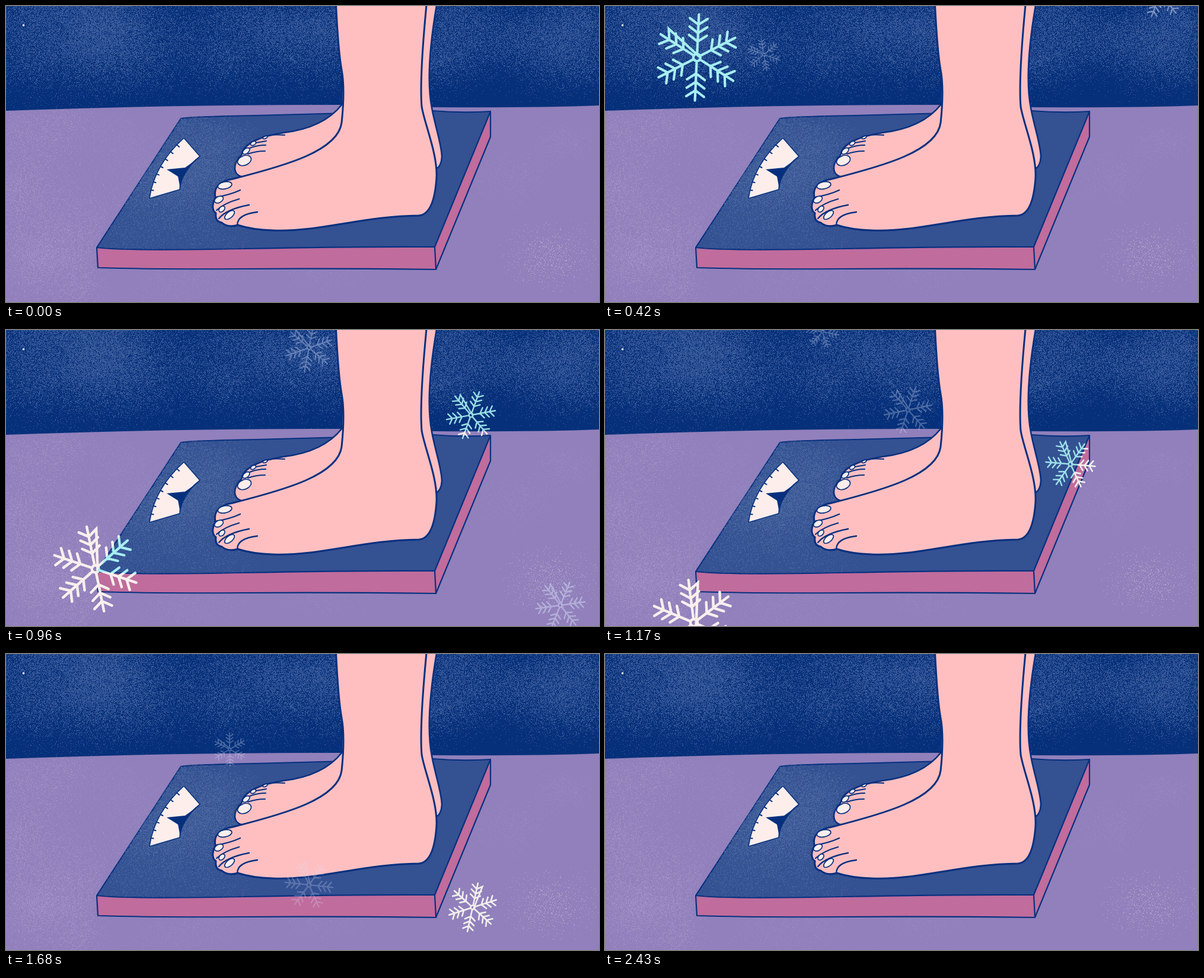
An HTML page with a canvas for the animation above (2520 ms loop, 1000 by 500 pixels).

```html
<!DOCTYPE html>
<html lang="en">
<head>
<meta charset="utf-8">
<title>Snow over a bathroom scale</title>
<style>
html, body { margin: 0; height: 100%; overflow: hidden; background: #1f4288; }
canvas { display: block; width: 100vw; height: 100vh; }
</style>
</head>
<body>
<canvas id="stage" width="1000" height="500"></canvas>
<script>
const LOOP = 2520, STEP = 30, LAST = 2430;
const INK = '#06307e', SKIN = '#ffbfc1', CREAM = '#fdeeec', CYAN = '#a6eef0', MIST = '#d3dcf5';
const stage = document.getElementById('stage').getContext('2d');
const scene = document.createElement('canvas');
scene.width = 1000;
scene.height = 500;
const g = scene.getContext('2d');

let seed = 7;
const rand = () => (seed = (seed * 16807) % 2147483647) / 2147483647;

const wall = new Path2D('M0 0H1000V180H0Z');
const floor = new Path2D('M0 177Q300 166 560 167L720 171Q900 172 1000 168V500H0Z');
const plate = new Path2D(`M295 190L153 408Q200 414 400 410T723 407L817 178
  Q770 181 720 177L420 185Q310 187 295 190Z`);
const slab = new Path2D('M153 408L155 442Q250 445 400 444T725 445L817 221V178Z');
const dial = new Path2D('M300 223L327 254Q293 280 293 310L242 325Q250 268 300 223Z');
const pointer = new Path2D('M271 276L302 273 327 255Q297 280 294 309L290 288Z');
const farLeg = new Path2D(`M570-12H728Q706 110 718 172C724 205 735 235 735 255Q734 270 726 275
  L600 300 405 289C380 289 382 265 397 252C400 232 430 220 468 214Q535 206 566 167Z`);
const nearLeg = new Path2D(`M556-12H710Q697 120 701 170C706 200 728 250 726 290
  Q722 352 696 354C600 355 530 382 450 379Q415 378 391 370Q374 375 364 366Q352 364 354 350
  Q344 343 353 323Q348 298 383 292C470 270 560 245 566 197Q572 140 566 108Q560 75 556-12Z`);

// Where snow reads white: floor and skin; the plate winds the other way and cuts a hole.
const pale = new Path2D();
[floor, plate, farLeg, nearLeg].forEach(p => pale.addPath(p));

function shape(path, fill, width) {
  if (fill) { g.fillStyle = fill; g.fill(path); }
  if (width) { g.lineWidth = width; g.stroke(path); }
}

// Printed texture: soft clouds of specks, spread over a box and kept inside a path.
function specks(path, color, clouds, [x, y, w, h]) {
  g.save();
  g.clip(path);
  g.fillStyle = color;
  const spread = size => (rand() + rand() + rand() - 1.5) * size;
  for (let i = 0; i < clouds; i++) {
    const cx = x + rand() * w, cy = y + rand() * h, size = 40 + rand() * 60;
    for (let n = 0; n < size * 12; n++)
      g.fillRect(cx + spread(size) | 0, cy + spread(size * .7) | 0, 1, 1);
  }
  g.restore();
}

function nails(list) {
  for (const [x, y, rx, ry, turn] of list) {
    const nail = new Path2D();
    nail.ellipse(x, y, rx, ry, turn, 0, 7);
    shape(nail, CREAM, 1.7);
  }
}

function drawScene() {
  g.lineJoin = g.lineCap = 'round';
  g.strokeStyle = INK;
  shape(wall, '#06307a');
  specks(wall, '#3a5b9b', 95, [0, 0, 1000, 105]);

  shape(floor, '#9180bb');
  specks(floor, '#a292c8', 16, [0, 180, 130, 300]);
  specks(floor, '#9a8ac1', 14, [130, 180, 870, 320]);
  specks(floor, '#b4a8d0', 1, [910, 423, 10, 1]);
  g.fillStyle = CREAM;
  g.fillRect(28, 31, 3, 3);

  shape(slab, '#c06c9d', 2.2);
  shape(plate, '#345192', 2.2);
  specks(plate, '#4a689f', 25, [190, 200, 200, 190]);
  shape(new Path2D('M723 407L725 445'), null, 2.2);

  shape(dial, CREAM, 1.6);
  shape(pointer, INK);
  for (let i = 1; i < 8; i++) {
    const t = i / 8, s = 1 - t;
    const x = s * s * 300 + 2 * s * t * 250 + t * t * 242;
    const y = s * s * 223 + 2 * s * t * 268 + t * t * 325;
    shape(new Path2D(`M${x} ${y}l4 ${4 * s}`), null, 2);
  }

  shape(farLeg, SKIN, 2.6);
  shape(new Path2D('M433 221Q448 216 470 218M416 232l23-4M411 240Q424 235 438 235M408 250Q422 245 437 245'), null, 2);
  nails([[402, 261, 12, 8, -.4], [405, 245, 7, 4, -.7], [417, 232, 5, 3, -.5], [437, 222, 4, 2, -.4]]);

  shape(nearLeg, SKIN, 3);
  shape(new Path2D(`M354 323Q378 319 395 311M355 345Q368 333 393 326M359 359Q372 343 410 336
    M390 370Q390 352 424 348`), null, 2.3);
  nails([[369, 303, 12, 6, -.2], [359, 327, 8, 5, -.5], [364, 343, 6, 4, -.8], [377, 353, 10, 5, -.7]]);
}

// Unit snowflake: six arms, each with three pairs of barbs.
const flake = new Path2D();
const arm = new Path2D('M0-.09V-.97');
for (const y of [.36, .55, .74]) arm.addPath(new Path2D(`M-.2-${y + .14}L0-${y}L.2-${y + .14}`));
for (let i = 0; i < 6; i++) flake.addPath(arm, new DOMMatrix().rotate(i * 60));
flake.arc(0, 0, .08, 0, 7);

function drawFlake(x, y, r, turn, alpha, faint) {
  const paint = color => {
    stage.save();
    stage.translate(x, y);
    stage.rotate(turn * Math.PI / 180);
    stage.scale(r, r);
    stage.globalAlpha = alpha;
    stage.lineWidth = .056;
    stage.strokeStyle = color;
    stage.stroke(flake);
    stage.restore();
  };
  if (faint) return paint(MIST);
  paint(CYAN);
  stage.save();
  stage.clip(pale);
  paint(CREAM);
  stage.restore();
}

const ramp = (v, a, b) => Math.max(0, Math.min(1, (v - a) / (b - a)));
const easeOut = v => Math.sin(Math.min(v, Math.PI / 2));

// Small faint flake that fades out midway and briefly returns.
function drawSmall(x, t) {
  const y = 82 + .31 * t;
  const seen = y < 260 ? 1 - ramp(y, 185, 230) : ramp(y, 310, 350) - ramp(y, 381, 392);
  drawFlake(x + .021 * t, y, 29, -10 + .035 * t, .33 * seen, true);
}

function draw(t) {
  stage.drawImage(scene, 0, 0);
  const u = t - 420, v = t - 690, w = t - 960;
  drawFlake(Math.max(150, 155 - .008 * u), 87 + 500 * easeOut(.00127 * u), 75,
    2.7 + 50 * easeOut(.00214 * u), 1);
  drawSmall(268, u);
  drawSmall(372, u - 1005);
  drawFlake(936 - .004 * v, 222 + .9 * v, 43, 22, .5, true);
  drawFlake(783 + .004 * v, 37 + .395 * v, 43, .073 * v, .92);
  drawFlake(511, 30 + .5 * w, 42, 11 + .035 * w, .36 - .1 * ramp(w, 0, 420), true);
}

drawScene();
stage.lineCap = 'round';
const start = performance.now();
function tick() {
  const t = (performance.now() - start) % LOOP;
  draw(Math.min(LAST, Math.floor(t / STEP) * STEP));
  requestAnimationFrame(tick);
}
tick();
</script>
</body>
</html>
```
